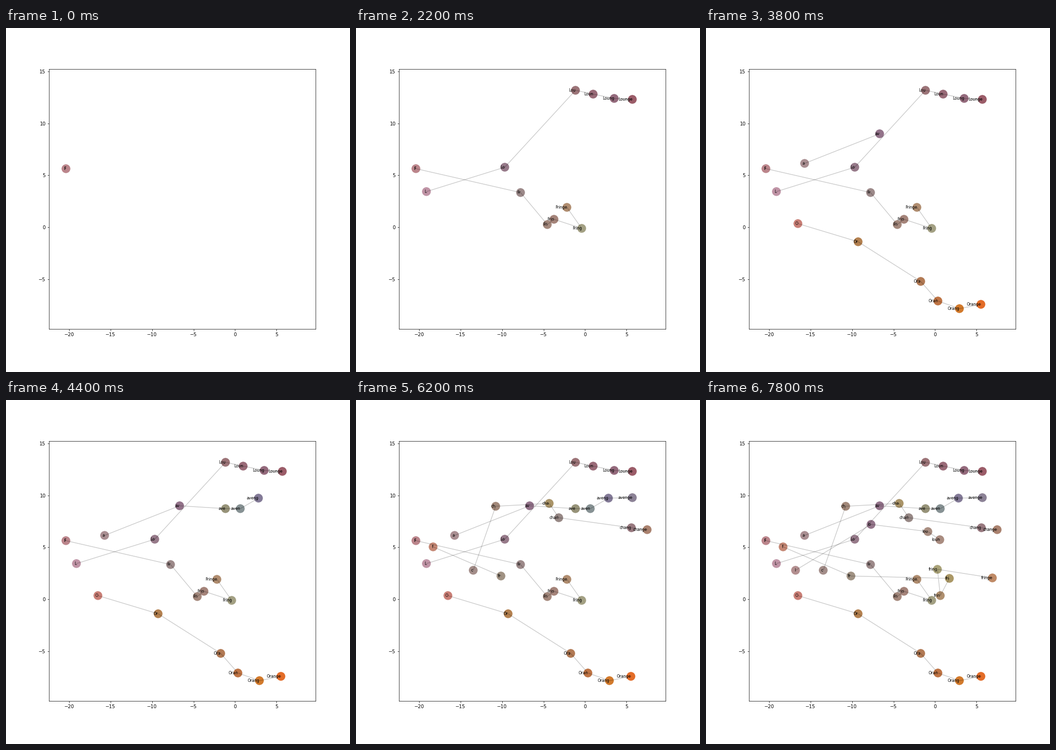
These frames come from a looping animation (720 by 720 pixels, 8 s). A matplotlib script:

```python
import matplotlib.pyplot as plt
import numpy as np
from matplotlib.animation import FuncAnimation

SIZE = 720
STEP_MS = 200
TEXT_SIZE = 8

# word, stage position of each prefix, colour of each prefix
WORDS = [
    ("Fringe",
     [(125, 294), (344, 344), (400, 411), (414, 400), (472, 419), (441, 375)],
     "bb858b 9d8a8a a4887c a5847a a3a083 b08d70"),
    ("Lounge",
     [(147, 342), (311, 291), (459, 130), (496, 138), (540, 147), (578, 149)],
     "c094a6 977a8a 9c7478 9a6b78 946a7c 9b5c68"),
    ("Orange",
     [(192, 409), (318, 447), (449, 530), (485, 571), (530, 587), (575, 578)],
     "c97f76 b48150 b27a54 bf7444 d27a2c e36c28"),
    ("avenge",
     [(206, 283), (363, 221), (459, 227), (490, 227), (528, 205), (578, 204)],
     "aa8f92 93738a 979379 879294 837a97 8c8296"),
    ("change",
     [(245, 356), (292, 222), (404, 216), (424, 246), (576, 267), (609, 271)],
     "a38d89 a28879 aa9468 978885 98797f aa826f"),
    ("fringe",
     [(161, 307), (303, 368), (509, 373), (490, 409), (484, 354), (599, 372)],
     "c58875 a09283 ab9866 af8f6f aaa379 bf8a66"),
    ("loun",
     [(187, 356), (345, 260), (464, 275), (489, 292)],
     "b38f90 94758a a88d80 a98c80"),
]

plt.rcParams.update({"font.family": "DejaVu Sans", "font.size": 10})
fig, ax = plt.subplots(figsize=(SIZE / 72, SIZE / 72), dpi=72)
fig.subplots_adjust(left=0.125, right=0.9, bottom=0.125, top=0.88)
ax.set_xlim(-22.42, 9.70)
ax.set_ylim(-9.80, 15.22)
ax.set_xticks(range(-20, 6, 5))
ax.set_yticks(range(-5, 16, 5))


def to_data(points):
    px = np.array(points, float) + 0.4
    px[:, 1] = SIZE - px[:, 1]
    return ax.transData.inverted().transform(px)


def add_label(pos, text):
    return ax.text(*pos, text, size=TEXT_SIZE, ha="right", va="center",
                   visible=False)


paths, colors, labels, lines = [], [], [], []
for word, points, shades in WORDS:
    path = to_data(points)
    paths.append(path)
    colors += ["#" + c for c in shades.split()]
    labels += [add_label(p, word[:i + 1]) for i, p in enumerate(path)]
    lines += ax.plot([], [], color="black", alpha=0.2, lw=1.5)

spots = np.vstack(paths)
dots = ax.scatter([], [], s=300, linewidths=1)

# the very first label is printed twice, which makes it look bolder
add_label(spots[0], WORDS[0][0][0]).set_visible(True)


def update(frame):
    shown = frame + 1
    dots.set_offsets(spots[:shown])
    dots.set_facecolor(colors[:shown])
    dots.set_edgecolor(colors[:shown])
    for i, label in enumerate(labels):
        label.set_visible(i < shown)
    left = shown
    for line, path in zip(lines, paths):
        line.set_data(*path[:max(left, 0)].T)
        left -= len(path)
    return [dots, *lines, *labels]


anim = FuncAnimation(fig, update, frames=len(spots), init_func=lambda: update(0),
                     interval=STEP_MS, repeat=True, repeat_delay=0)
plt.show()
```
